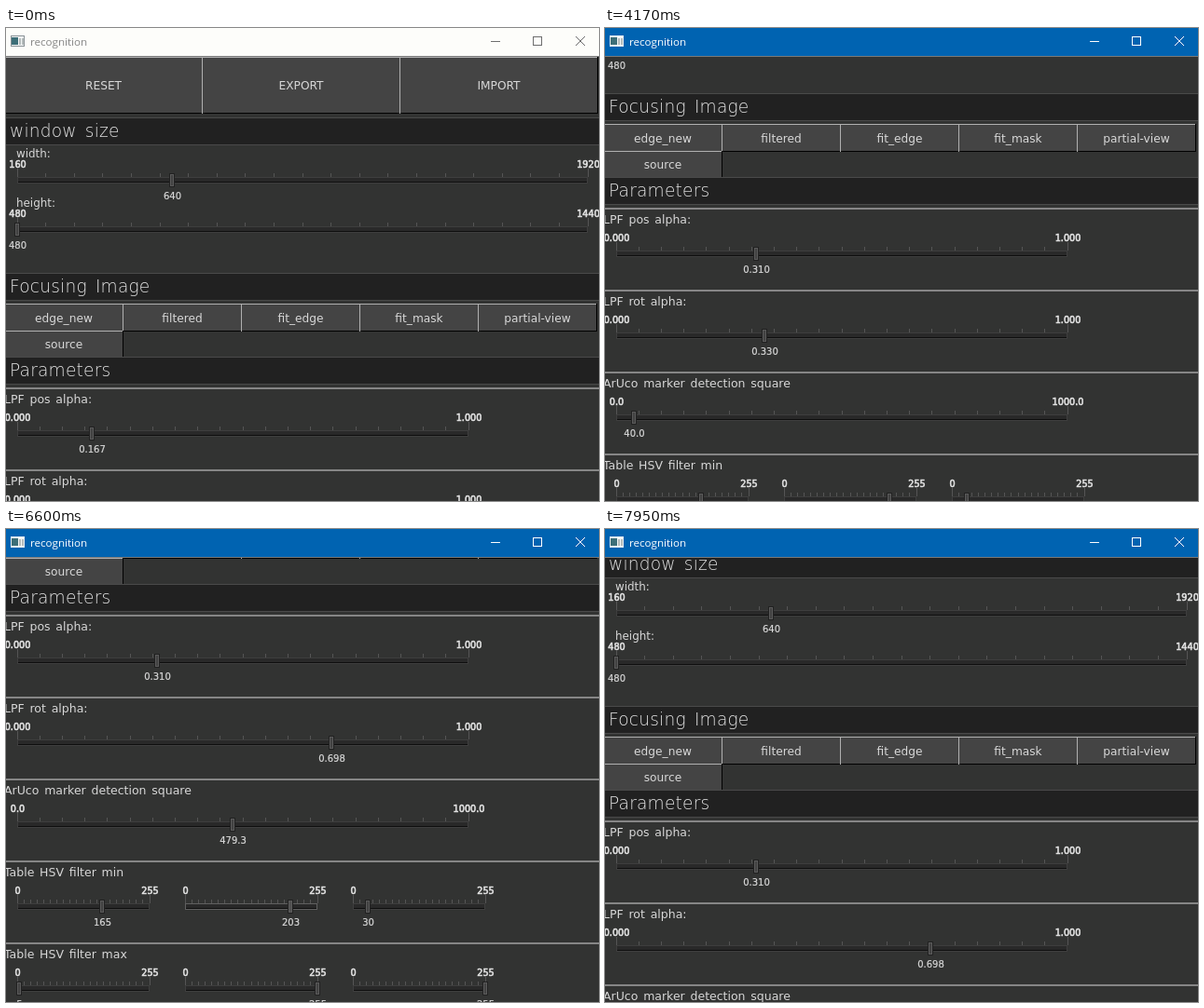
These frames come from a looping animation (636 by 508 pixels, 8000 ms). An HTML page with a canvas:

```html
<!DOCTYPE html>
<html lang="en">
<head>
<meta charset="utf-8">
<title>recognition</title>
<style>
  html, body { margin: 0; width: 100%; height: 100%; overflow: hidden; background: #333; }
  canvas { display: block; }
</style>
</head>
<body>
<canvas id="stage" width="636" height="508"></canvas>
<script>
const ctx = document.getElementById('stage').getContext('2d');
const LOOP = 8000, TICK = 30;
const HERSHEY = '"DejaVu Sans", sans-serif';

// Keys are [time, value]: scrolling interpolates, slider values jump.
const SCROLL = [[0, 0], [3300, 0], [3390, 65], [3480, 165], [3540, 195], [4080, 195], [4170, 193],
  [4530, 191], [5790, 191], [6000, 212], [6390, 280], [6600, 294], [6690, 294], [6900, 240],
  [7200, 135], [7380, 95], [7500, 88], [7530, 88], [7800, 75], [7920, 75], [7950, 73]];
const POS = [[0, 0.167], [2700, 0.31]];
const ROT = [[0, 0.33], [4800, 0.698]];
const SQUARE = [[0, 40], [5100, 483.5], [5310, 479.3]];

function stepAt(keys, t) {
  return keys.filter(key => key[0] <= t).pop()[1];
}

function lerpAt(keys, t) {
  const i = keys.findIndex(key => key[0] > t);
  if (i < 0) return keys[keys.length - 1][1];
  const [t0, v0] = keys[i - 1], [t1, v1] = keys[i];
  return v0 + (v1 - v0) * (t - t0) / (t1 - t0);
}

function rect(x, y, w, h, color) {
  ctx.fillStyle = color;
  ctx.fillRect(x, y, w, h);
}

function text(str, x, y, size, options = {}) {
  const { align = 'left', color = '#d8d8d8', weight = 400, bold = 0, family = HERSHEY,
    tracking = 0, gap = 0 } = options;
  ctx.font = `${weight} ${size}px ${family}`;
  ctx.letterSpacing = tracking + 'px';
  ctx.wordSpacing = gap + 'px';
  ctx.textAlign = align;
  ctx.fillStyle = ctx.strokeStyle = color;
  ctx.fillText(str, x, y);
  if (bold) {
    ctx.lineWidth = bold;
    ctx.strokeText(str, x, y);
  }
}

function button(label, x, y, w, h) {
  rect(x, y, w, h, '#444');
  rect(x, y + h - 1, w, 1, '#000');
  rect(x + w - 1, y, 1, h, '#000');
  rect(x, y, w - 1, 1, '#b0b0b0');
  rect(x, y, 1, h, '#b0b0b0');
  text(label, x + w / 2, y + h / 2 + 4.5, 12.2, { align: 'center' });
}

function heading(label, y) {
  rect(0, y, 636, 30, '#4a4a4a');
  rect(0, y + 1, 636, 28, '#212121');
  text(label, 4, y + 21, 18.6, { weight: 200, color: '#e4e4e4', tracking: 0.2, gap: 3 });
}

function slider(x, mid, w, min, max, value, digits = 0, hover = false) {
  const top = mid - 3;
  for (let i = 0; i <= 20; i++) {
    const len = i % 20 ? 4 : 9;
    rect(Math.floor(x + w * i / 20), top - len, 1, len, '#555');
  }
  rect(x, top, w, 7, hover ? '#606060' : '#3e3e3e');
  rect(x + 1, top + 1, w - 2, 5, '#292929');
  rect(x + 1, top + 5, w - 2, 1, '#0e0e0e');

  const hx = Math.floor(x + w * (value - min) / (max - min));
  rect(hx - 3, top - 4, 6, 15, '#212121');
  rect(hx - 2, top - 3, 4, 13, '#5a5a5a');
  rect(hx - 1, top - 2, 2, 11, hover ? '#525252' : '#424242');

  const limit = { align: 'center', bold: 0.6, color: '#e4e4e4' };
  text(min.toFixed(digits), x + 0.5, mid - 13, 9.7, limit);
  text(max.toFixed(digits), x + w + 0.5, mid - 13, 9.7, limit);
  text(value.toFixed(digits), hx + 0.5, mid + 20.5, 10, { align: 'center', bold: 0.2 });
}

function panel(t) {
  const over = (from, to) => t >= from && t < to;

  ['RESET', 'EXPORT', 'IMPORT'].forEach((s, i) => button(s, -2 + 212 * i, 31, 213, 61));

  heading('window size', 96);
  text('width:', 11, 139, 11.9);
  slider(12, 163, 612, 160, 1920, 640, 0, over(330, 360));
  text('height:', 11, 192, 11.9);
  slider(12, 216, 612, 480, 1440, 480);

  heading('Focusing Image', 263);
  ['edge_new', 'filtered', 'fit_edge', 'fit_mask', 'partial-view']
    .forEach((s, i) => button(s, -2 + 127 * i, 296, 128, 30));
  button('source', -2, 325, 128, 29);

  heading('Parameters', 353);
  ['LPF pos alpha:', 'LPF rot alpha:', 'ArUco marker detection square',
    'Table HSV filter min', 'Table HSV filter max'].forEach((s, i) => {
    rect(0, 386 + 88 * i, 636, 2, '#868686');
    text(s, -2, 403 + 88 * i, 12.5, { gap: 1.8 });
  });
  slider(12, 435, 484, 0, 1, stepAt(POS, t), 3, over(2370, 2910));
  slider(12, 523, 484, 0, 1, stepAt(ROT, t), 3, over(3900, 3960) || over(4530, 4860));
  slider(12, 611, 484, 0, 1000, stepAt(SQUARE, t), 1, over(4860, 5460));
  [165, 203, 30].forEach((v, i) => slider(12 + 180 * i, 699, 142, 0, 255, v, 0, i === 1 && over(6600, 6720)));
  [5, 255, 255].forEach((v, i) => slider(12 + 180 * i, 787, 142, 0, 255, v));
}

function titleBar(active) {
  const ink = active ? '#fff' : '#6e6e6e';
  rect(0, 0, 636, 30, active ? '#0063b1' : '#fdfdfa');
  rect(0, 30, 636, 1, '#7a7a7a');

  rect(5, 8, 15, 12, active ? '#e8eef2' : '#8a9296');
  rect(6, 9, 13, 10, '#f4f6f6');
  rect(6, 10, 7, 8, '#3d6f78');
  rect(14, 11, 2, 7, '#b5bcbc');
  rect(17, 11, 2, 7, '#b5bcbc');

  text('recognition', 26, 19, 11.6, { color: active ? '#fff' : '#858585', family: '"Open Sans", sans-serif' });

  ctx.strokeStyle = ink;
  ctx.lineWidth = 1;
  rect(520, 14, 10, 1, ink);
  ctx.strokeRect(565.5, 9.5, 9, 9);
  ctx.beginPath();
  ctx.moveTo(611, 9);
  ctx.lineTo(621, 19);
  ctx.moveTo(621, 9);
  ctx.lineTo(611, 19);
  ctx.stroke();
}

function draw() {
  const t = Math.floor(performance.now() % LOOP / TICK) * TICK;
  rect(0, 0, 636, 508, '#323332');
  ctx.save();
  ctx.translate(0, -Math.round(lerpAt(SCROLL, t)));
  panel(t);
  ctx.restore();
  titleBar(t >= 2640);
  requestAnimationFrame(draw);
}
draw();
</script>
</body>
</html>
```
